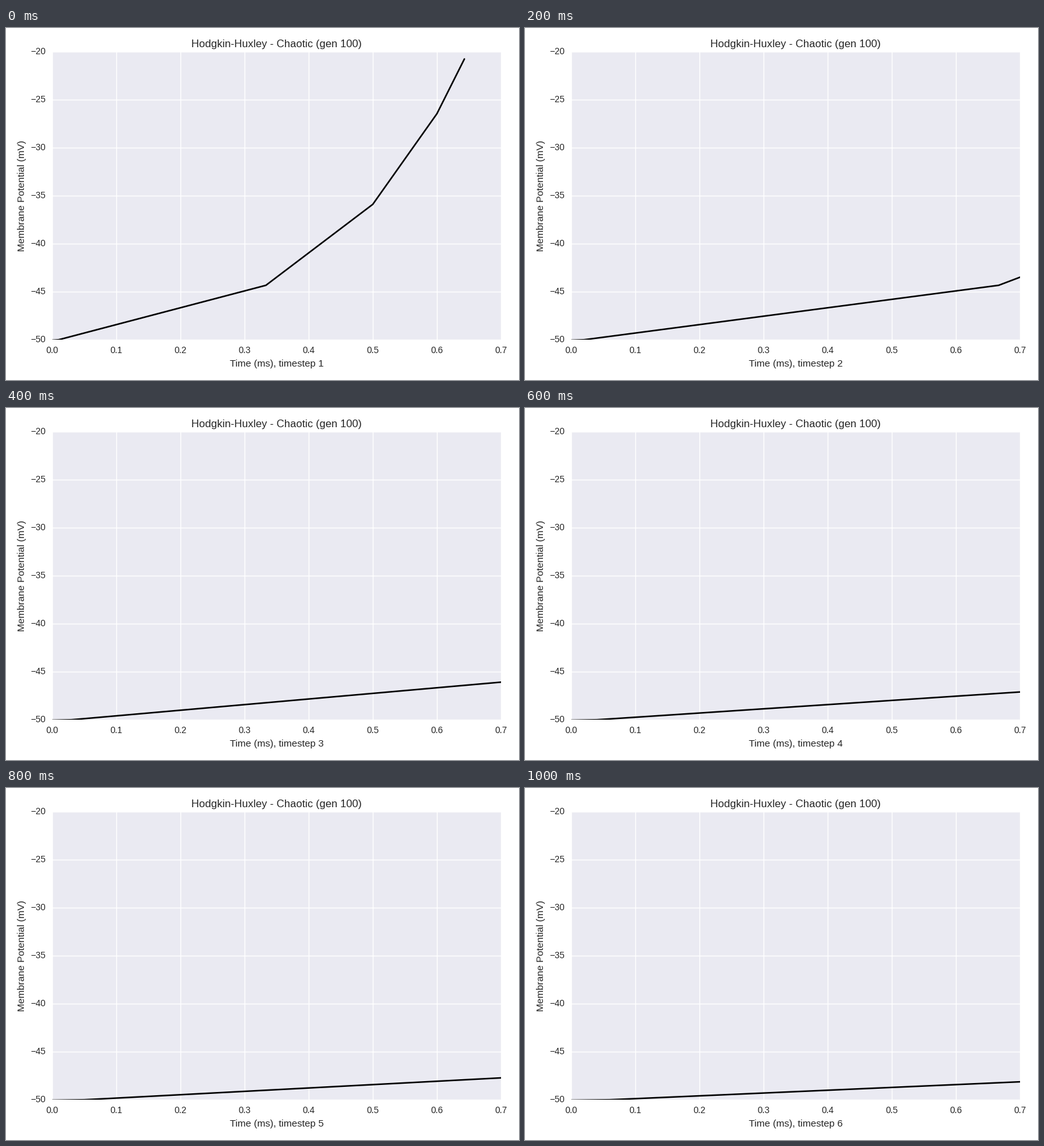
Recreate the animation shown at these times as a matplotlib script. Size 800 by 550 pixels, loop 1200 ms.

```python
import numpy as np
import matplotlib.pyplot as plt
from matplotlib.animation import FuncAnimation

FRAMES, INTERVAL = 6, 200
WIDTH, HEIGHT, DPI = 800, 550, 100
LEFT, RIGHT, TOP, BOTTOM = 72, 772, 36.95, 487.3
INK = "0.15"

plt.rcParams.update({
    "font.family": "Liberation Sans",
    "text.color": INK,
    "axes.labelcolor": INK,
    "axes.facecolor": "#EAEAF2",
    "axes.linewidth": 0,
    "axes.axisbelow": True,
    "axes.grid": True,
    "grid.color": "white",
    "grid.linewidth": 1,
    "grid.linestyle": "-",
    "axes.titlesize": 12,
    "axes.titlepad": 5,
    "axes.labelsize": 11,
    "axes.labelpad": 5,
    "xtick.labelsize": 10,
    "ytick.labelsize": 10,
    "xtick.color": INK,
    "ytick.color": INK,
    "xtick.major.size": 0,
    "ytick.major.size": 0,
    "xtick.major.pad": 7,
    "ytick.major.pad": 7,
    "ytick.alignment": "center",
    "lines.solid_capstyle": "round",
})

# Sample times for a unit timestep, and the membrane potential at each.
unit_time = np.array([0, 0.01, 1 / 3, 1 / 2, 3 / 5, 9 / 14])
potential = np.array([-50.04, -49.99, -44.32, -35.89, -26.46, -20.76])

fig = plt.figure(figsize=(WIDTH / DPI, HEIGHT / DPI), dpi=DPI,
                 facecolor="white")
ax = fig.add_axes([LEFT / WIDTH, 1 - BOTTOM / HEIGHT,
                   (RIGHT - LEFT) / WIDTH, (BOTTOM - TOP) / HEIGHT])
ax.set(xlim=(0, 0.7), ylim=(-50, -20),
       xticks=np.arange(8) / 10, yticks=np.arange(-50, -19, 5),
       title="Hodgkin-Huxley - Chaotic (gen 100)",
       ylabel="Membrane Potential (mV)")
trace, = ax.plot([], [], color="black", lw=1.75)


def update(frame):
    step = frame + 1
    trace.set_data(step * unit_time, potential)
    ax.set_xlabel(f"Time (ms), timestep {step}")
    return trace, ax.xaxis.label


anim = FuncAnimation(fig, update, frames=FRAMES, interval=INTERVAL,
                     repeat=True, repeat_delay=0, blit=False)
plt.show()
```
